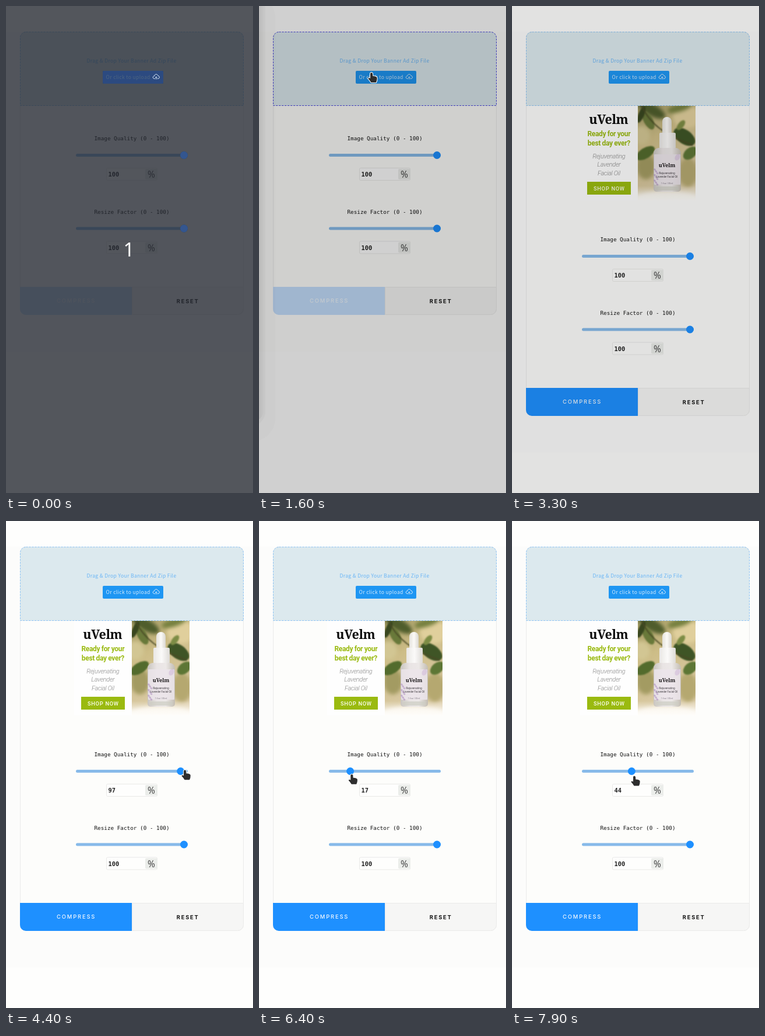
Recreate the animation shown at these times as an HTML page with a canvas. Size 424 px wide and 834 px high, loop 8000 ms.

```html
<!DOCTYPE html>
<html lang="en">
<head>
<meta charset="utf-8">
<title>Banner compressor</title>
<style>
html, body { margin: 0; width: 100%; height: 100%; overflow: hidden; background: #fefefd; }
canvas { display: block; width: 424px; height: 834px; }
</style>
</head>
<body>
<canvas id="stage"></canvas>
<script>
const W = 424, H = 834, LOOP = 8000, STEP = 100;
const canvas = document.getElementById('stage');
const c = canvas.getContext('2d');
const dpr = window.devicePixelRatio || 1;
canvas.width = W * dpr;
canvas.height = H * dpr;

const BLUE = '#1e90ff', GREEN = '#9aba10', BRAND = 'uVelm';
const HUMANIST = '"Noto Sans CJK JP", "Noto Sans CJK SC", "Noto Sans", sans-serif';
const MONO = '"DejaVu Sans Mono", monospace';

// Key points: [time, value...]
const DIM = [[1300, 0], [1400, .04], [1600, .18], [1900, .38], [3000, .38],
  [3100, .31], [3200, .2], [3300, .11], [3500, .05], [3900, 0]];
const QUALITY = [[4300, 100], [5200, 6], [5400, 0], [5600, 11], [6000, 15],
  [6200, 15], [7000, 26], [7400, 44]];
const HOVER = [[500, 222, 156], [900, 193, 113.5]];
const DRAG = [[4000, 252, 450], [4100, 313, 425], [4300, 313, 425], [5200, 140, 447],
  [5400, 131, 442], [5600, 147, 436], [6000, 156, 434], [6200, 156, 434],
  [7000, 177, 429], [7400, 208, 425], [7800, 208, 425], [7900, 210, 436]];
const IMAGE_AT = 3200, ENABLED_AT = 3000;

function at(keys, t, i = 1) {
  if (t <= keys[0][0]) return keys[0][i];
  for (let k = 1; k < keys.length; k++) {
    const a = keys[k - 1], b = keys[k];
    if (t <= b[0]) {
      const p = (t - a[0]) / (b[0] - a[0]);
      return a[i] + (b[i] - a[i]) * p * p * (3 - 2 * p);
    }
  }
  return keys[keys.length - 1][i];
}

function rect(x, y, w, h, fill, r = 0) {
  c.beginPath();
  c.roundRect(x, y, w, h, r);
  c.fillStyle = fill;
  c.fill();
}

function frame(x, y, w, h, color, r = 0, dash = []) {
  c.beginPath();
  c.roundRect(x + .5, y + .5, w - 1, h - 1, r);
  c.setLineDash(dash);
  c.strokeStyle = color;
  c.lineWidth = 1;
  c.stroke();
  c.setLineDash([]);
}

function ellipse(x, y, rx, ry, turn, fill) {
  c.beginPath();
  c.ellipse(x, y, rx, ry, turn, 0, Math.PI * 2);
  c.fillStyle = fill;
  c.fill();
}

function text(str, x, y, font, fill, spacing = 0, align = 'left') {
  c.font = font;
  c.letterSpacing = spacing + 'px';
  c.textAlign = align;
  c.fillStyle = fill;
  c.fillText(str, x + (align === 'center' ? spacing / 2 : 0), y);
}

function fade(x0, y0, x1, y1, ...stops) {
  const g = c.createLinearGradient(x0, y0, x1, y1);
  stops.forEach((s, i) => g.addColorStop(i / (stops.length - 1), s));
  return g;
}

function cloud(x, y) {
  c.beginPath();
  c.moveTo(x + 4, y + 8);
  c.lineTo(x + 2.8, y + 8);
  c.bezierCurveTo(x - 1, y + 7.6, x - .4, y + 3.6, x + 2.5, y + 3.5);
  c.bezierCurveTo(x + 3.2, y - .6, x + 8.3, y - .4, x + 8.9, y + 3);
  c.bezierCurveTo(x + 12.4, y + 3.2, x + 12, y + 8, x + 8.8, y + 8);
  c.lineTo(x + 7.5, y + 8);
  c.moveTo(x + 5.8, y + 9);
  c.lineTo(x + 5.8, y + 4.8);
  c.moveTo(x + 4.2, y + 6.2);
  c.lineTo(x + 5.8, y + 4.6);
  c.lineTo(x + 7.4, y + 6.2);
  c.strokeStyle = '#e2f0fd';
  c.lineWidth = 1;
  c.stroke();
}

function hand(x, y) {
  c.save();
  c.translate(x, y);
  c.beginPath();
  c.moveTo(-2, 2);
  c.quadraticCurveTo(0, -1, 2, 2);
  c.lineTo(2.4, 6.5);
  c.quadraticCurveTo(9.5, 6.5, 9.7, 10);
  c.quadraticCurveTo(9.8, 14, 8, 17.5);
  c.lineTo(-.5, 17.5);
  c.quadraticCurveTo(-3, 13.5, -5.5, 11);
  c.quadraticCurveTo(-5, 8.2, -2, 10.5);
  c.closePath();
  c.lineJoin = 'round';
  c.strokeStyle = '#fff';
  c.lineWidth = 2;
  c.stroke();
  c.fillStyle = '#2e2e2e';
  c.fill();
  c.restore();
}

function dropZone(hover) {
  rect(24, 44, 384, 127, '#dce9ee', [10, 10, 0, 0]);
  frame(24, 44, 384, 127, hover ? '#4b46e2' : '#8fc3f3', [10, 10, 0, 0], [3, 2]);
  text('Drag & Drop Your Banner Ad Zip File', 138.5, 97, '8.6px ' + HUMANIST, '#69b5f6', .33);
  uploadButton('#1e96f3', '#d3e9fc');
}

function uploadButton(fill, ink) {
  rect(166, 111, 104, 22, fill, 2);
  text('Or click to upload', 171.5, 125, '8.6px ' + HUMANIST, ink, .33);
  cloud(252, 116.5);
}

const thumbX = v => 126.7 + v * 1.788;

function thumb(v, y, fill) {
  ellipse(thumbX(v), y, 6.5, 6.5, 0, fill);
}

function slider(label, v, y) {
  text(label, 216, y, '9.33px ' + MONO, '#111', 0, 'center');
  rect(120, y + 23, 192, 5, '#87bae9', 2.5);
  thumb(v, y + 25.5, BLUE);
  rect(172, y + 47, 88, 22, '#fefefd', 2);
  frame(172, y + 47, 88, 22, '#e9e9e7', 2);
  rect(239, y + 49, 21, 18, '#ebedea', 2);
  text(String(Math.round(v)), 175.5, y + 62, 'bold 10.4px ' + MONO, '#222');
  text('%', 249.5, y + 64, '15.5px "Noto Sans", sans-serif', '#4a4a4a', 0, 'center');
}

function footer(y, enabled) {
  const font = 'px Inter, sans-serif';
  rect(216, y, 192, 48, '#f6f6f5', [0, 0, 10, 0]);
  frame(216, y, 192, 48, '#eaeae9', [0, 0, 10, 0]);
  rect(24, y, 192, 48, enabled ? BLUE : '#c3defc', [0, 0, 0, 10]);
  text('COMPRESS', 87, y + 27, '500 9.4' + font, enabled ? '#f2f8ff' : '#eef5fb', 1.85);
  text('RESET', 292.8, y + 28, '700 9.4' + font, '#151515', 1.75);
}

function bottle() {
  rect(258, 190, 16, 32, fade(258, 0, 274, 0, '#e4e2dc', '#fbfaf7', '#dad7d0'), [8, 8, 2, 2]);
  rect(253, 217, 28, 27, fade(253, 0, 281, 0, '#e9e7e4', '#fbfaf9', '#dedbd7'), 2);
  rect(243, 243, 47, 75, fade(243, 0, 290, 0, '#c9c5bf', '#e9e4e4', '#ece8e7', '#c3bdb2'), [9, 9, 5, 5]);
  rect(244, 254, 45, 52, 'rgba(237,230,236,.85)', 1);
  for (let i = 0; i < 9; i++)
    ellipse(245 + i % 3 * 2.2, 280 + i * 3.2, 2, 1.6, .6, 'rgba(172,138,190,.55)');
  ellipse(284, 259, 4, 6, .5, 'rgba(205,180,215,.5)');
  rect(247, 309, 39, 7, 'rgba(205,205,196,.7)', 3);
  text(BRAND, 266, 276, 'bold 9px "Noto Serif", serif', '#1d1a1c', -.1, 'center');
  const tiny = 'px Roboto, sans-serif';
  text('Rejuvenating', 266, 288, '5' + tiny, '#4a454b', -.1, 'center');
  text('Lavender Facial Oil', 266, 294, '4.6' + tiny, '#4a454b', -.1, 'center');
  text('1 fl oz / 30 ml', 266, 305, '3.4' + tiny, '#77727a', 0, 'center');
}

function photo() {
  c.save();
  c.beginPath();
  c.rect(216, 171, 99, 162);
  c.clip();
  rect(216, 171, 99, 162, fade(216, 171, 300, 333, '#a39a63', '#cdbd87', '#d6c69c', '#e2d3b4'));
  c.filter = `blur(${3 * dpr}px)`;
  ellipse(300, 190, 24, 20, 0, '#e0cf9c');
  ellipse(222, 222, 15, 16, 0, '#d2c693');
  ellipse(240, 178, 26, 10, .5, '#4f5d2c');
  ellipse(288, 174, 22, 7, -.3, '#76803f');
  ellipse(230, 275, 16, 22, 0, '#a39b62');
  ellipse(302, 285, 17, 25, 0, '#b5a870');
  ellipse(265, 336, 62, 19, 0, '#f8f2e7');
  c.filter = `blur(${dpr}px)`;
  ellipse(234, 196, 8, 17, -.5, '#69793a');
  ellipse(222, 186, 5, 15, .4, '#39471f');
  ellipse(229, 252, 18, 9, -.55, '#536b2d');
  ellipse(296, 224, 21, 12, .6, '#3f5526');
  ellipse(306, 252, 14, 9, -.7, '#5d7635');
  ellipse(290, 204, 10, 5, -.9, '#7d8c45');
  c.strokeStyle = '#4a4a25';
  c.lineWidth = 2;
  c.beginPath();
  c.moveTo(222, 169);
  c.quadraticCurveTo(240, 215, 310, 238);
  c.stroke();
  c.filter = 'none';
  rect(216, 308, 99, 25, fade(0, 308, 0, 333, 'rgba(254,252,247,0)', '#fefdfa'));
  bottle();
  c.restore();
}

function banner() {
  rect(117, 171, 198, 162, '#fefefe');
  photo();
  const sans = 'px Roboto, sans-serif';
  const line = (s, y, font, ink, gap) => text(s, 166.5, y, font + sans, ink, gap, 'center');
  text(BRAND, 166, 202, 'bold 21.5px "Noto Serif", serif', '#0c0c0c', -.4, 'center');
  line('Ready for your', 223, 'bold 12', GREEN, -.35);
  line('best day ever?', 238.5, 'bold 12', GREEN, -.35);
  ['Rejuvenating', 'Lavender', 'Facial Oil'].forEach((s, i) =>
    line(s, 261 + i * 14.4, 'italic 300 11', '#8c8c8c', -.35));
  rect(129, 301, 75, 22, GREEN);
  line('SHOP NOW', 316, '500 9.3', '#fbfdf0', .7);
}

function dialogShadow(strength) {
  c.globalAlpha = strength;
  rect(-60, -20, 88, 766, 'rgba(0,0,0,.015)', 40);
  rect(-60, -20, 71, 740, 'rgba(0,0,0,.03)', 26);
  rect(-60, -20, 68, 732, fade(0, 0, 9, 0, 'rgba(0,0,0,.06)', 'rgba(0,0,0,0)'), 20);
  c.globalAlpha = 1;
}

function countdown() {
  rect(0, 0, W, H, 'rgba(35,39,48,.78)');
  uploadButton('#2c4a80', '#4d6580');
  [255.5, 381].forEach(y => thumb(100, y, '#34568f'));
  text('1', 211, 428.5, '33px "Noto Sans", sans-serif', '#fff', 0, 'center');
}

function draw(t) {
  const loaded = t >= IMAGE_AT;
  const shift = loaded ? 173 : 0;
  const dim = at(DIM, t);
  c.setTransform(dpr, 0, 0, dpr, 0, 0);
  rect(0, 0, W, H, '#fefefd');
  rect(0, 44, W, 548 + shift, '#fcfcfb');
  rect(24, 44, 384, 485 + shift, '#fdfdfb', 10);
  frame(24, 44, 384, 485 + shift, '#ebebea', 10);
  if (loaded) banner();
  dropZone(t >= 500 && !loaded);
  slider('Image Quality (0 - 100)', at(QUALITY, t), 230 + shift);
  slider('Resize Factor (0 - 100)', 100, 355.5 + shift);
  footer(481 + shift, t >= ENABLED_AT);

  if (dim) rect(0, 0, W, H, `rgba(0,0,0,${dim})`);
  if (dim && !loaded) dialogShadow(Math.min(1, dim / .18));
  if (t >= 500 && t < 1700) hand(at(HOVER, t), at(HOVER, t, 2));
  if (t >= 4000) hand(at(DRAG, t), at(DRAG, t, 2));
  if (t < 100) countdown();
}

let start, last = -1;
function tick(now) {
  start ??= now;
  const t = Math.floor((now - start) % LOOP / STEP) * STEP;
  if (t !== last) draw(last = t);
  requestAnimationFrame(tick);
}
draw(0);
requestAnimationFrame(tick);
</script>
</body>
</html>
```
